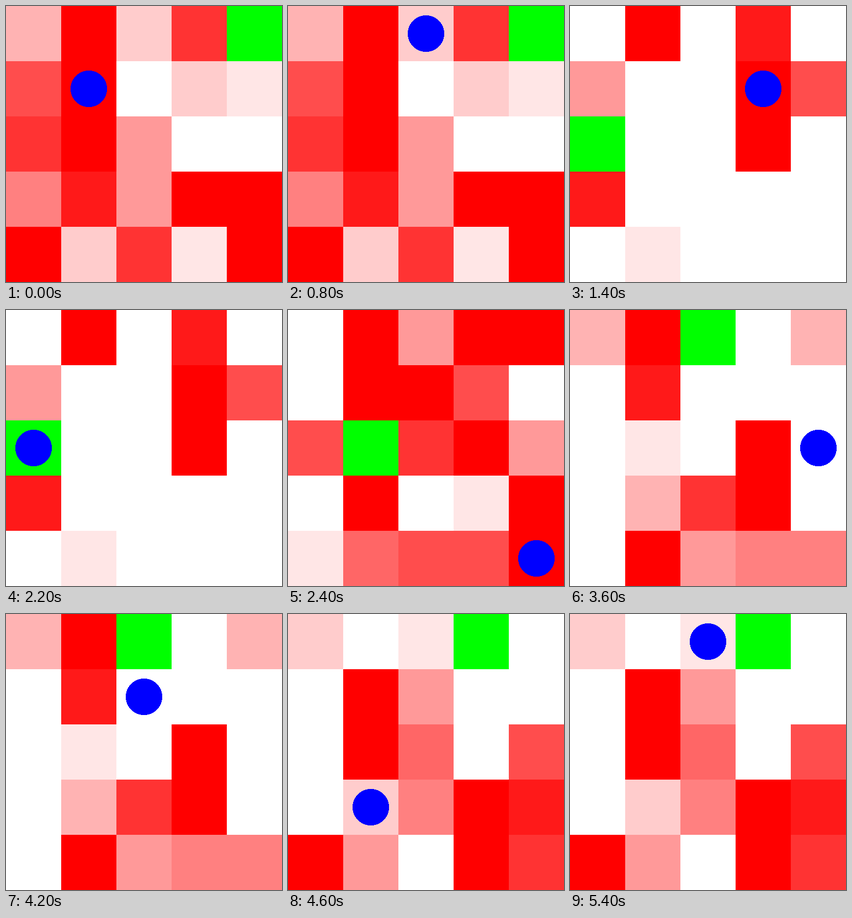
An HTML page with a canvas that plays this animation: 500x500 px, repeating every 8000 ms.

```html
<!DOCTYPE html>
<html lang="en">
<head>
<meta charset="utf-8">
<title>Grid walk</title>
<style>
  html, body { margin: 0; width: 100%; height: 100%; overflow: hidden; background: #fff; }
  canvas { display: block; width: 500px; height: 500px; }
</style>
</head>
<body>
<canvas id="stage" width="500" height="500"></canvas>
<script>
const CELL = 100, RADIUS = 33, STEP = 200, LOOP = 8000;
const MOVES = { L: [-1, 0], R: [1, 0], U: [0, -1], D: [0, 1] };

// Tiles: "." white, "#" red, a digit for tenths of red, "G" the goal.
const rounds = [
  { map: ["3#28G", "7#.21", "8#4..", "594##", "#281#"], start: [1, 1], path: "LURRRR" },
  { map: [".#.9.", "4..#7", "G..#.", "9....", ".1..."], start: [3, 1], path: "DLLL" },
  { map: [".#4##", ".##7.", "7G8#4", ".#.1#", "1677#"], start: [4, 4], path: "LLULU" },
  { map: ["3#G.3", ".9...", ".1.#.", ".38#.", ".#455"], start: [4, 2], path: "LULU" },
  { map: ["2.1G.", ".#4..", ".#6.7", ".25#9", "#4.#8"], start: [1, 3], path: "UURU" },
];

const ctx = document.getElementById("stage").getContext("2d");

function tileColor(tile) {
  if (tile === "G") return "#0f0";
  if (tile === ".") return "#fff";
  if (tile === "#") return "#f00";
  const shade = Math.round(255 * (1 - tile / 10));
  return `rgb(255, ${shade}, ${shade})`;
}

function drawMap(map) {
  map.forEach((row, y) => [...row].forEach((tile, x) => {
    ctx.fillStyle = tileColor(tile);
    ctx.fillRect(x * CELL, y * CELL, CELL, CELL);
  }));
}

// A disc of whole pixels, without smoothed edges.
function drawWalker(x, y) {
  const cx = (x + 0.5) * CELL, cy = (y + 0.5) * CELL;
  ctx.fillStyle = "#00f";
  for (let dy = -RADIUS; dy < RADIUS; dy++) {
    const half = Math.round(Math.sqrt(RADIUS ** 2 - (dy + 0.5) ** 2));
    ctx.fillRect(cx - half, cy + dy, 2 * half, 1);
  }
}

function locate(step) {
  let i = 0;
  while (i < rounds.length - 1 && step > rounds[i].path.length) {
    step -= rounds[i++].path.length + 1;
  }
  return [rounds[i], step];
}

function draw(time) {
  const [{ map, start, path }, step] = locate(Math.floor((time % LOOP) / STEP));
  let [x, y] = start;
  for (const move of path.slice(0, step)) {
    x += MOVES[move][0];
    y += MOVES[move][1];
  }
  drawMap(map);
  drawWalker(x, y);
}

const begin = performance.now();
function tick() {
  draw(performance.now() - begin);
  requestAnimationFrame(tick);
}
tick();
</script>
</body>
</html>
```
